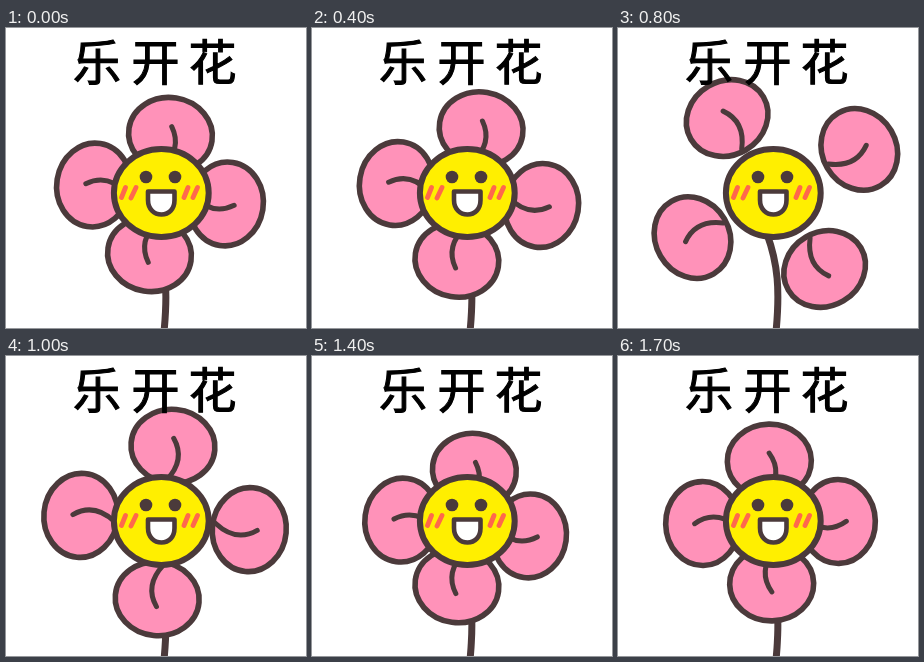
Animation of 300 by 300 pixels, one loop 1.8 s. Source, as an HTML page:

```html
<!DOCTYPE html>
<html lang="zh">
<head>
<meta charset="utf-8">
<title>乐开花</title>
<style>
  html, body { margin: 0; width: 100%; height: 100%; overflow: hidden; background: #fff; }
  svg { display: block; width: 100vw; height: 100vh; }
  text { font: 400 48px "Noto Sans CJK SC", "Noto Sans CJK", sans-serif; text-anchor: middle; stroke: #000; stroke-width: 1.1; }
  .line { fill: none; stroke: #4b3a3b; stroke-width: 5; stroke-linecap: round; stroke-linejoin: round; }
</style>
</head>
<body>
<svg viewBox="0 0 300 300">
  <defs>
    <g id="petal" class="line">
      <ellipse rx="42" ry="37" fill="#ff92b9" stroke-width="5.6"/>
      <path d="M0-8Q14 12-3 34"/>
    </g>
  </defs>
  <path class="line" d="M149 206C160 236 162 262 158 304" style="stroke-width:7"/>
  <g id="petals"></g>
  <g id="face">
    <ellipse class="line" cx="155.3" cy="165" rx="47.4" ry="44" style="fill:#ffef00;stroke-width:6"/>
    <circle cx="140" cy="149" r="6.3" fill="#4b3a3b"/>
    <circle cx="169" cy="149" r="6.3" fill="#4b3a3b"/>
    <path class="line" d="M142 163.500H168.500V172C168.500 181 163 186.500 155.500 186.500S142 181 142 172Z" style="fill:#fff;stroke-width:4.6"/>
    <path d="M119.500 159.500L115.500 169.500M130 159.500L125 170M182 159.500L178 169.500M191.500 159.500L187 169.500" fill="none" stroke="#ff684c" stroke-width="4.8" stroke-linecap="round"/>
  </g>
  <text x="91 149.500 206.500" y="51.500">乐开花</text>
</svg>
<script>
const LOOP = 1800, STEP = 100;

// step, turn in degrees, distance from hub, hub x, hub y
const keys = [
  [0, 9, 63.9, 154, 166.5],
  [4, 99.5, 70, 157, 166.5],
  [6, 129.3, 93, 157.9, 166],
  [8, 149.7, 92, 157.9, 165.5],
  [12, 228.5, 68, 159, 168.3],
  [15, 304.1, 60.1, 151.5, 172.5],
  [17, 359, 64.6, 152.5, 166.5]
];

// Keys repeat each loop; step and turn keep growing.
function key(i) {
  const n = keys.length, lap = Math.floor(i / n);
  const [s, turn, ...rest] = keys[i - lap * n];
  return [s + lap * 18, turn + lap * 360, ...rest];
}

function slope(i, c) {
  const rate = (a, b) => (b[c] - a[c]) / (b[0] - a[0]);
  const k = key(i);
  return (rate(key(i - 1), k) + rate(k, key(i + 1))) / 2;
}

function pose(step) {
  let i = 0;
  while (key(i + 1)[0] <= step) i++;
  const a = key(i), b = key(i + 1), h = b[0] - a[0];
  const u = (step - a[0]) / h, v = 1 - u;
  return [1, 2, 3, 4].map(c =>
    a[c] * v * v * (1 + 2 * u) + b[c] * u * u * (3 - 2 * u) +
    h * u * v * (slope(i, c) * v - slope(i + 1, c) * u));
}

const group = document.getElementById("petals");
const petals = [0, 1, 2, 3].map(() => {
  const use = document.createElementNS("http://www.w3.org/2000/svg", "use");
  use.setAttribute("href", "#petal");
  return group.appendChild(use);
});

function draw(ms) {
  const [turn, dist, cx, cy] = pose(Math.floor(ms % LOOP / STEP));
  petals.forEach((petal, i) => {
    const deg = turn + i * 90, a = deg * Math.PI / 180;
    const x = cx + 1.05 * dist * Math.sin(a);
    const y = cy - 0.95 * dist * Math.cos(a);
    petal.setAttribute("transform", `translate(${x} ${y}) rotate(${deg})`);
  });
}

const start = performance.now();
function tick() {
  draw(performance.now() - start);
  requestAnimationFrame(tick);
}
tick();
</script>
</body>
</html>
```
